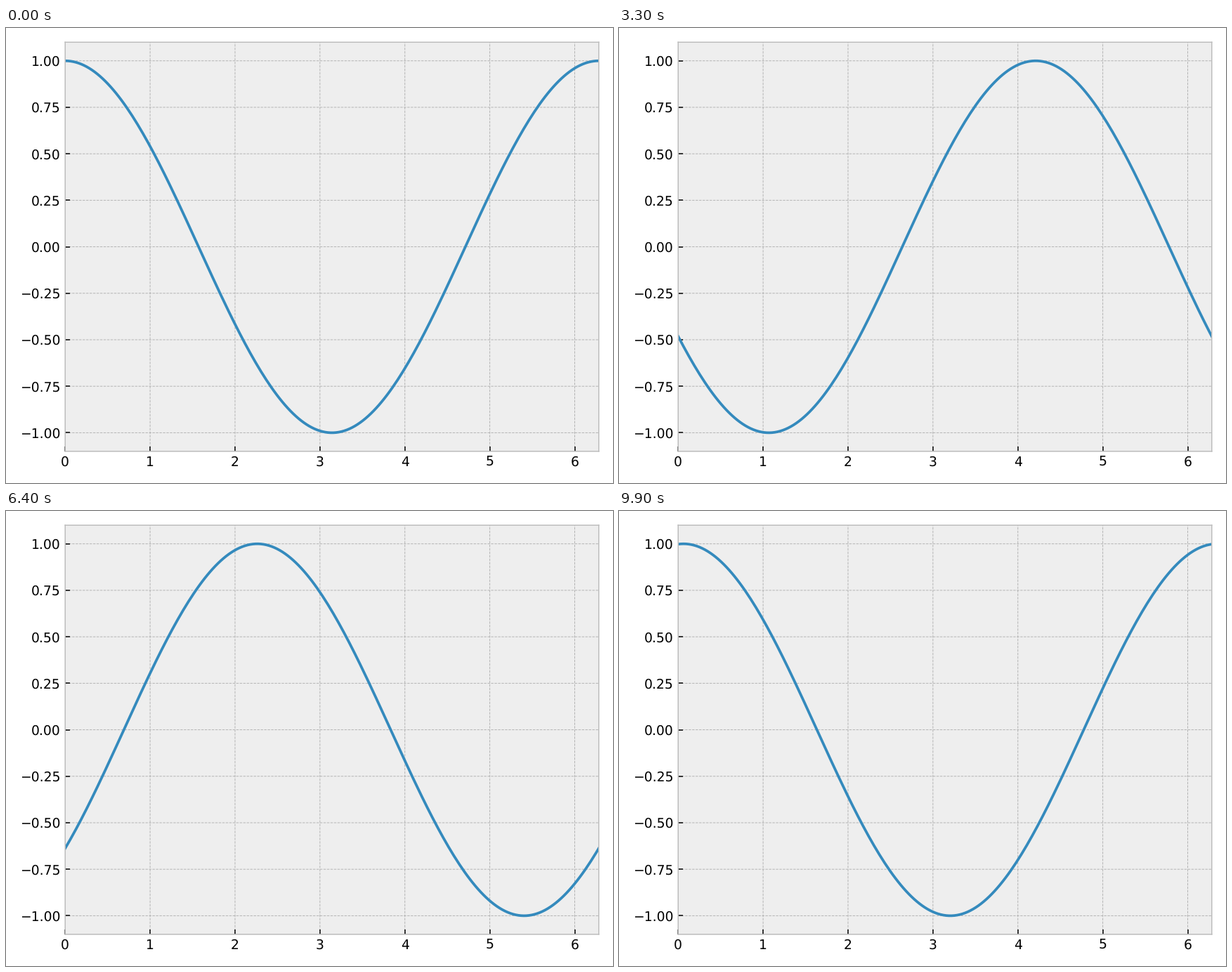
A matplotlib script that plays this animation: 864 px wide and 648 px high, repeating every 10 s.

```python
import numpy as np
import matplotlib.pyplot as plt
from matplotlib.animation import FuncAnimation

FRAMES = 100
INTERVAL = 100  # ms
DPI = 135
LAYOUT_DPI = 300  # fine layout, free of glyph rounding
TAU = 2 * np.pi

plt.style.use("bmh")
plt.rcParams["text.hinting"] = "none"

fig, ax = plt.subplots(figsize=(6.4, 4.8), dpi=LAYOUT_DPI)
x = np.linspace(0, TAU, 200)
line, = ax.plot(x, np.cos(x))
ax.set_xlim(0, TAU)
ax.set_ylim(-1.1, 1.1)
fig.tight_layout()
fig.set_dpi(DPI)

# Keep ticks, grid and frame at their true sub-pixel positions.
for axis in (ax.xaxis, ax.yaxis):
    for artist in axis.get_ticklines() + axis.get_gridlines():
        artist.set_snap(False)
for spine in ax.spines.values():
    spine.set_snap(False)


def update(i):
    """Shift the wave left by one full period per loop."""
    line.set_ydata(np.cos(x + TAU * i / FRAMES))
    return line,


anim = FuncAnimation(fig, update, frames=FRAMES, interval=INTERVAL,
                     repeat=True, repeat_delay=0)
plt.show()
```
